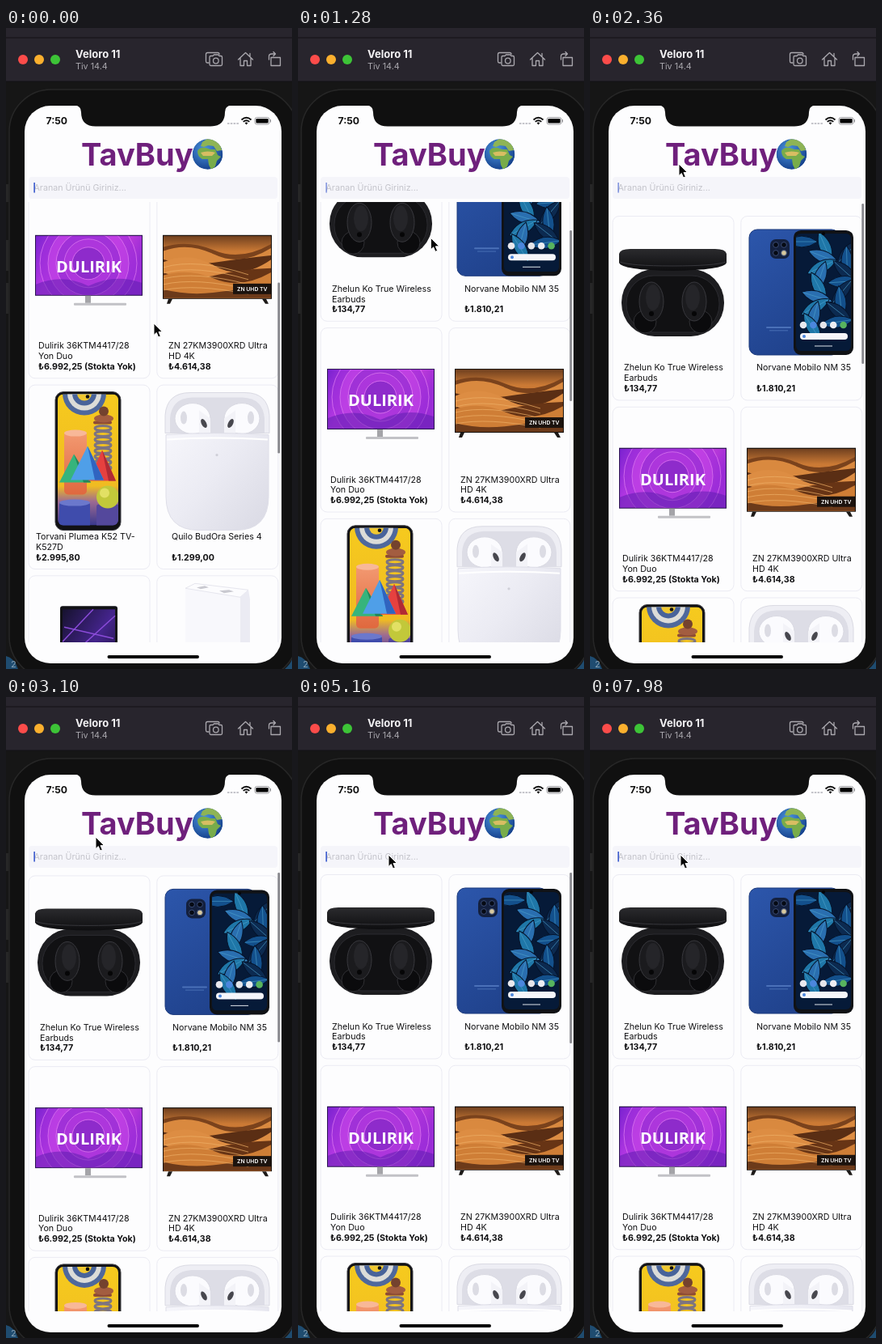
An HTML page that plays this animation: 354x792 px, repeating every 8000 ms.

```html
<!DOCTYPE html>
<html lang="tr">
<head>
<meta charset="utf-8">
<title>Shop list</title>
<style>
  html, body { margin: 0; width: 100%; height: 100%; overflow: hidden; background: #161616; }
  svg { display: block; width: 100vw; height: 100vh; }
  text { font-family: Inter, "Noto Sans", sans-serif; }
  .item { font-size: 10.7px; fill: #101012; }
  .price { font-weight: 700; }
  .line { fill: none; stroke: #aaa8ae; stroke-width: 1.3; stroke-linejoin: round; stroke-linecap: round; }
</style>
</head>
<body>
<svg viewBox="0 0 354 792" preserveAspectRatio="none">
  <defs>
    <clipPath id="list"><rect x="23" y="215" width="318" height="544"/></clipPath>
    <clipPath id="ball"><circle cx="249.500" cy="156" r="18.800"/></clipPath>
    <clipPath id="leafClip"><rect x="255" y="22" width="68" height="145" rx="6"/></clipPath>
    <clipPath id="tvClip"><rect x="37" y="52" width="131" height="73"/></clipPath>
    <clipPath id="duneClip"><rect x="195" y="52" width="133" height="77"/></clipPath>
    <clipPath id="artClip"><rect x="64" y="12" width="75" height="162" rx="7"/></clipPath>
    <radialGradient id="sea" cx=".4" cy=".35" r=".7"><stop stop-color="#4c96e0"/><stop offset="1" stop-color="#123c88"/></radialGradient>
    <linearGradient id="lid" x2="0" y2="1"><stop stop-color="#2b2b2e"/><stop offset="1" stop-color="#0e0e10"/></linearGradient>
    <linearGradient id="back" x2=".5" y2="1"><stop stop-color="#2c56ab"/><stop offset="1" stop-color="#20428c"/></linearGradient>
    <linearGradient id="glow" x2="1" y2=".3"><stop stop-color="#7a22d0"/><stop offset=".3" stop-color="#b93ae4"/><stop offset=".7" stop-color="#d143dd"/><stop offset="1" stop-color="#9a2cd6"/></linearGradient>
    <linearGradient id="sky" x2="0" y2="1"><stop stop-color="#70401f"/><stop offset=".25" stop-color="#cb7a35"/><stop offset="1" stop-color="#c06c2b"/></linearGradient>
    <linearGradient id="art" x2="0" y2="1"><stop stop-color="#f6ca1e"/><stop offset=".7" stop-color="#f0bb22"/><stop offset=".82" stop-color="#9c6a92"/><stop offset="1" stop-color="#38388e"/></linearGradient>
    <linearGradient id="coral" x2="0" y2="1"><stop stop-color="#f39a72"/><stop offset="1" stop-color="#e0683e"/></linearGradient>
    <linearGradient id="shell" x2="1" y2=".8"><stop stop-color="#f6f6fb"/><stop offset=".5" stop-color="#ebebf3"/><stop offset="1" stop-color="#dcdce6"/></linearGradient>
    <linearGradient id="neon" x2="1" y2="1"><stop stop-color="#16122e"/><stop offset=".5" stop-color="#44248c"/><stop offset="1" stop-color="#120e24"/></linearGradient>
  </defs>

  <!-- simulator window -->
  <rect width="354" height="792" fill="#161616"/>
  <rect width="354" height="66" fill="#28252d"/>
  <path d="M0 12H354M0 66H354" stroke="#121114"/>
  <path d="M0 776Q10 778 15 792H0Z" fill="#1f4c70"/>
  <text x="6" y="790" font-size="11" fill="#88a4b8">2</text>
  <path d="M345 792Q352 786 354 780V792Z" fill="#1f4c70"/>
  <rect x="4" y="76" width="357" height="728" rx="52" fill="#101010" stroke="#272727" stroke-width="1.500"/>
  <path d="M1.500 193V215M1.500 262V300M1.500 315V353" stroke="#272727" stroke-width="3"/>
  <circle cx="21" cy="39" r="6" fill="#fc4c4a"/>
  <circle cx="41" cy="39" r="6" fill="#fbb02e"/>
  <circle cx="61" cy="39" r="6" fill="#3dc437"/>
  <text x="86" y="37" font-size="13" font-weight="700" fill="#f4f3f5">Veloro 11</text>
  <text x="86" y="51" font-size="10.800" fill="#a9a7ad">Tiv 14.4</text>
  <g class="line">
    <path d="M251 43H249Q247.500 43 247.500 41V32.500Q247.500 30.500 249.500 30.500H262Q264 30.500 264 32.500"/>
    <path d="M252 36Q252 34.500 253.500 34.500H256L257.500 33H262.500L264 34.500H266Q267.500 34.500 267.500 36V45Q267.500 46.500 266 46.500H253.500Q252 46.500 252 45Z"/>
    <circle cx="259.800" cy="40.500" r="3.300"/>
    <path d="M287.500 39L296.500 30.500L305.500 39M290 37V46.500H294.500V40.500H298.500V46.500H303V37M302 31.500V35"/>
    <path d="M328 36.500H339.500V46.500H328ZM325.500 39V35Q325.500 32 329 32H333M331 29.500L333.500 32L331 34.500"/>
  </g>

  <!-- phone screen -->
  <rect x="23" y="96" width="318" height="689" rx="32" fill="#fdfdfe"/>
  <path d="M85 95.500Q93 96 93 104Q93 121.500 111 121.500H253Q271 121.500 271 104Q271 96 279 95.500Z" fill="#101010"/>
  <text x="49.500" y="119" font-size="12.200" font-weight="700" fill="#111">7:50</text>
  <path d="M274 118H288" stroke="#c4c4ca" stroke-width="2" stroke-dasharray="2.500 1.300"/>
  <g fill="none" stroke="#111" stroke-width="1.900">
    <path d="M291.500 113.500Q297.500 108 303.500 113.500M293.700 115.900Q297.500 112.500 301.300 115.900"/>
    <rect x="308" y="110.500" width="18" height="8.500" rx="2.500" stroke="#919196" stroke-width=".9"/>
  </g>
  <path d="M295.600 117.300Q297.500 115.700 299.400 117.300L297.500 119.400Z"/>
  <rect x="309.400" y="112" width="15.200" height="5.500" rx="1.200"/>
  <path d="M327.500 113V116.500" stroke="#919196"/>
  <text x="93" y="170" font-size="38" font-weight="700" fill="#6f207c">TavBuy</text>
  <g clip-path="url(#ball)">
    <circle cx="249.500" cy="156" r="19" fill="url(#sea)"/>
    <path d="M237 152Q240 147 247 148L253 150L259 150L262 157L266 159L261 164L259 171L254 175L251 169L250 162L243 162Q237 159 237 152Z" fill="#78ac4a"/>
    <path d="M241 146L243 141L249 137L257 138L265 143L267 151L261 152L257 146L250 145L245 147Z" fill="#8eb455"/>
    <path d="M241 154Q249 151 259 154L255 158H244Z" fill="#d8bd62"/>
  </g>
  <rect x="28" y="184" width="308" height="27" rx="4" fill="#f5f5fa"/>
  <text x="34.500" y="201" font-size="10.700" fill="#c4c4cb">Aranan Ürünü Giriniz...</text>
  <rect id="caret" x="34.300" y="191" width="1.700" height="12.500" fill="#4461cf"/>

  <g clip-path="url(#list)"><g id="cards"></g></g>
  <rect id="bar" x="336.300" y="217" width="2.700" rx="1.300" fill="#88888d"/>
  <rect x="125.500" y="775" width="113.500" height="4" rx="2" fill="#080808"/>
  <path id="mouse" d="M0 0V14.500L3.300 11.500L5.600 17L8.300 15.800L6 10.500H10.500Z" fill="#050505" stroke="#fff" stroke-width="1"/>
</svg>

<script>
const $ = id => document.getElementById(id);
const LOOP = 8000, TOP = 219, PITCH = 235.75;

const circle = (x, y, r, fill, more = '') => `<circle cx="${x}" cy="${y}" r="${r}" fill="${fill}" ${more}/>`;
const oval = (x, y, rx, ry, fill, more = '') => `<ellipse cx="${x}" cy="${y}" rx="${rx}" ry="${ry}" fill="${fill}" ${more}/>`;
const box = (x, y, w, h, r, fill, more = '') => `<rect x="${x}" y="${y}" width="${w}" height="${h}" rx="${r}" fill="${fill}" ${more}/>`;
const path = (d, fill, more = '') => `<path d="${d}" fill="${fill}" ${more}/>`;
const stroke = (d, color, w = 1) => path(d, 'none', `stroke="${color}" stroke-width="${w}"`);
const times = (n, f) => Array.from({ length: n }, (_, i) => f(i)).join('');

function earbuds() {
  const bud = (x, dir) =>
    circle(x - dir * 8, 131, 14, '#0b0b0d', 'stroke="#303034"') +
    oval(x, 106, 15, 24, '#1b1b1e', 'stroke="#38383d"') +
    oval(x + dir * 2, 101, 9, 16, '#252529') + circle(x, 121, 3, '#060607');
  return box(39, 66, 127, 83, 41, '#1d1d20') + box(45, 74, 115, 70, 34, '#111113', 'stroke="#2b2b30"') +
    bud(76, 1) + bud(129, -1) +
    path('M36 47Q37 41 50 41H155Q168 41 169 47V58Q166 67 102 68Q39 67 36 58Z', 'url(#lid)') +
    stroke('M37 57Q50 62 102 62Q155 62 168 57', '#37373c');
}

function bluePhone() {
  const leaf = i => {
    const x = 262 + (i * 29) % 60, y = 32 + i * 6.2, a = (i * 67) % 180;
    const fill = ['#13508c', '#1f77a8', '#0c2a50', '#2a6fb0'][i % 4];
    return `<g transform="translate(${x} ${y}) rotate(${a})">` +
      path('M-20 0Q0 -14 20 0Q0 14 -20 0Z', fill, 'stroke="#05142c"') + stroke('M-18 0H18', '#4b9fca', .6) + '</g>';
  };
  const icons = ['#e9e9ee', '#4b86dd', '#e5e5ea', '#eeeef2', '#58b45e'];
  return box(197, 17, 112, 155, 10, 'url(#back)', 'stroke="#1c3a7c"') +
    box(223, 29, 24, 24, 7, '#14203e') +
    times(4, i => circle(230 + i % 2 * 10, 36 + (i >> 1) * 10, 3.4, i == 3 ? '#d8c99e' : '#060a14', 'stroke="#3a4c78"')) +
    box(218, 137, 31, 2, 1, '#4a70b8') + box(222, 141, 23, 1.5, 0, '#3c62aa') +
    box(252, 18, 74, 154, 9, '#101216') +
    `<g clip-path="url(#leafClip)">` + box(255, 22, 68, 145, 0, '#061a38') + times(18, leaf) + '</g>' +
    icons.map((c, i) => circle(264 + i * 12.4, 135, 4.3, c)).join('') +
    box(260, 145, 59, 8, 4, '#f6f6fa') + circle(265, 149, 2, '#4b86dd') + circle(289, 22, 2, '#050508') +
    stroke('M278 161H300', '#dfe4ea', 1);
}

function glowTv() {
  const rings = ['#a02fdb', '#c847e8', '#8e2bd0', '#b53ae0', '#7a24c0'];
  return box(36, 51, 133, 75, 0, '#2a1450') + '<g clip-path="url(#tvClip)">' +
    box(37, 52, 131, 73, 0, 'url(#glow)') +
    rings.map((c, i) => circle(102, 86, 60 - i * 10, c, 'opacity=".6" stroke="#ee8cf6"')).join('') +
    path('M37 112Q70 98 102 114Q135 98 168 110V126H37Z', '#5a1cae', 'opacity=".5"') + '</g>' +
    `<text x="102.500" y="97" font-size="20" font-weight="700" fill="#fff" text-anchor="middle" style="font-family:'Open Sans',sans-serif">DULIRIK</text>` +
    box(98, 126, 7, 9, 0, '#a4a4a8') + box(84, 135, 65, 3, 1, '#c2c2c6');
}

function duneTv() {
  const dune = (y, bend, fill) => path(`M194 ${y}Q225 ${y - bend} 258 ${y + 4}T330 ${y - 5}V131H194Z`, fill);
  return box(194, 51, 135, 79, 0, '#17110d') + '<g clip-path="url(#duneClip)">' +
    box(195, 52, 133, 77, 0, 'url(#sky)') +
    dune(66, 10, '#7a421c') + dune(71, 12, '#d9893f') + dune(81, -9, '#5a2e14') +
    dune(85, 15, '#dd8d43') + dune(97, -12, '#673415') + dune(101, 10, '#cf7e36') + dune(118, -8, '#6c3a1a') +
    times(5, i => stroke(`M195 ${91 + i * 7}Q235 ${79 + i * 8} 300 ${100 + i * 6}`, '#eeb068', .7)) + '</g>' +
    box(281, 111, 47, 13, 0, '#1c130e') +
    '<text x="286" y="119.800" font-size="6.800" font-weight="600" fill="#fff">ZN UHD TV</text>' +
    path('M201 130H206L203 136H199ZM317 130H322L325 136H321Z', '#1d1a18');
}

function artPhone() {
  return box(61, 9, 81, 171, 10, '#111114', 'stroke="#3c3c42"') + '<g clip-path="url(#artClip)">' +
    box(64, 12, 75, 162, 0, 'url(#art)') +
    times(4, i => circle(97, 11, 27 - i * 6, ['#4f689c', '#dcdcd8', '#48639a', '#f0c830'][i])) +
    box(72, 58, 28, 78, 5, 'url(#coral)') + oval(86, 60, 14, 4, '#f8b898') +
    times(8, i => oval(120, 54 + i * 7, 10, 3, 'none', 'stroke="#7d7480" stroke-width="3"')) +
    box(108, 45, 23, 4, 2, '#8e4b34') + oval(121, 42, 12, 5, '#a35d40') + circle(121, 33, 6, '#74422e') +
    box(66, 145, 38, 32, 4, '#3f4cac') + oval(85, 146, 19, 4, '#6b78cc') +
    box(112, 148, 28, 30, 3, '#54489c') + circle(126, 139, 14, '#c2c83a') + circle(122, 134, 6, '#e2e064') +
    path('M84 86L66 121L105 121Z', '#36b47c') + path('M84 86L96 121H105Z', '#238558') +
    path('M119 81L102 119H136Z', '#e6413f') + path('M119 81L127 119H136Z', '#b02a34') +
    path('M101 76L80 118H121Z', '#4f9fe8') + path('M101 76L110 118H121Z', '#3064c0') + '</g>' +
    circle(101, 15, 2.3, '#101012');
}

function budCase() {
  const bud = (x, dir) => oval(x, 42, 22, 19, '#fbfbfe', 'stroke="#d9d9e2"') +
    path(`M${x + dir * 8} 32L${x + dir * 22} 42V61H${x + dir * 8}Z`, '#f3f3f8') +
    oval(x + dir * 14, 48, 3, 6, '#47474e', `transform="rotate(${-dir * 28} ${x + dir * 14} 48)"`) +
    oval(x - dir * 11, 41, 4, 8, '#dcdce4');
  return path('M197 60V38Q199 10 228 10H296Q324 10 326 38V60Z', '#eeeef4', 'stroke="#dadae3"') +
    path('M203 60V42Q205 17 230 16H293Q318 17 320 42V60Z', '#dddde6') +
    bud(231, 1) + bud(292, -1) +
    path('M198 62Q262 58 325 62V138Q325 180 284 180H239Q198 180 198 138Z', 'url(#shell)', 'stroke="#dedee8"') +
    stroke('M199 68Q262 64 324 68', '#fff', 2) + circle(261, 87, 1.6, '#cfcfd8');
}

function laptop() {
  return box(67, 38, 71, 110, 3, '#121216') + box(70, 42, 65, 102, 0, 'url(#neon)') +
    stroke('M70 82L108 42M82 98L135 50M72 64L133 78', '#8a4bd8', 1.5);
}

function whiteBox() {
  return path('M222 16L234 10L300 18L302 30V160H222Z', '#f8f8fc') +
    path('M222 16L234 10L300 18L290 27Z', '#fcfcfe', 'stroke="#e6e6ee"') +
    path('M290 27L300 18L302 30V160H290Z', '#ebebf3') +
    path('M236 15L246 13L251 15L241 17ZM264 19L276 18L282 20L270 22Z', '#c9c9d0');
}

// column, row, text x, picture, two title lines, price
const items = [
  [0, 0, 42, earbuds, 'Zhelun Ko True Wireless', 'Earbuds', '134,77'],
  [1, 0, 206, bluePhone, 'Norvane Mobilo NM 35', '', '1.810,21'],
  [0, 1, 40, glowTv, 'Dulirik 36KTM4417/28', 'Yon Duo', '6.992,25 (Stokta Yok)'],
  [1, 1, 201, duneTv, 'ZN 27KM3900XRD Ultra', 'HD 4K', '4.614,38'],
  [0, 2, 37, artPhone, 'Torvani Plumea K52 TV-', 'K527D', '2.995,80'],
  [1, 2, 205, budCase, 'Quilo BudOra Series 4', '', '1.299,00'],
  [0, 3, 40, laptop, '', '', ''],
  [1, 3, 205, whiteBox, '', '', '']
];

const label = (x, y, s, cls = '') => s && `<text class="item ${cls}" x="${x}" y="${y}">${s}</text>`;

$('cards').innerHTML = items.map(([col, row, x, draw, a, b, price]) =>
  `<g transform="translate(0 ${row * PITCH})">` +
  box(28 + col * 158.8, .5, 150, 227.5, 8, '#fdfdfe', 'stroke="#ebebf3"') + draw() +
  label(x, 191.5, a) + label(x, 204.3, b) + label(x, 217, price && '₺' + price, 'price') + '</g>').join('');

// smooth curve through [time, value] points, flat at turning points
function curve(pts, t) {
  const last = pts.length - 1;
  if (t >= pts[last][0]) return pts[last][1];
  const slope = i => (pts[i + 1][1] - pts[i][1]) / (pts[i + 1][0] - pts[i][0]);
  const tangent = i => {
    if (i == 0) return slope(0);
    if (i == last) return slope(last - 1);
    const a = slope(i - 1), b = slope(i);
    return a * b <= 0 ? 0 : (pts[i + 1][1] - pts[i - 1][1]) / (pts[i + 1][0] - pts[i - 1][0]);
  };
  let i = 0;
  while (t >= pts[i + 1][0]) i++;
  const d = pts[i + 1][0] - pts[i][0], u = (t - pts[i][0]) / d, v = 1 - u;
  return v * v * (1 + 2 * u) * pts[i][1] + u * u * (3 - 2 * u) * pts[i + 1][1] +
    d * u * v * (v * tangent(i) - u * tangent(i + 1));
}

const flick = [[0, -250], [.7, -215], [1.1, -134], [1.567, 0]];
const mouseX = [[0, 183], [.7, 181], [1.84, 142.5], [2.36, 110], [3.1, 111], [3.8, 112]];
const mouseY = [[0, 365], [.7, 301], [1.84, 219], [2.36, 168], [3.1, 173], [3.8, 195]];

// fling to the top, then a critically damped bounce
function scrollAt(t) {
  if (t < 1.567) return curve(flick, t);
  const s = t - 1.84;
  return (34 + 124.6 * s) * Math.exp(-3.9 * s);
}

const clamp = x => Math.max(0, Math.min(1, x));

function render(t) {
  const y = scrollAt(t);
  $('cards').setAttribute('transform', `translate(0 ${(TOP + y).toFixed(2)})`);
  $('bar').setAttribute('y', 217 + Math.max(0, -y) * .39);
  $('bar').setAttribute('height', 211 - Math.max(0, y));
  $('bar').setAttribute('opacity', 1 - clamp((t - 6.75) / .55));
  const p = t % 2.4;
  $('caret').setAttribute('opacity', clamp((1.4 - p) / .2) + clamp((p - 2.3) / .1));
  $('mouse').setAttribute('transform', `translate(${curve(mouseX, t)} ${curve(mouseY, t)})`);
}

const start = performance.now();
function tick() {
  render((performance.now() - start) % LOOP / 1000);
  requestAnimationFrame(tick);
}
tick();
</script>
</body>
</html>
```
